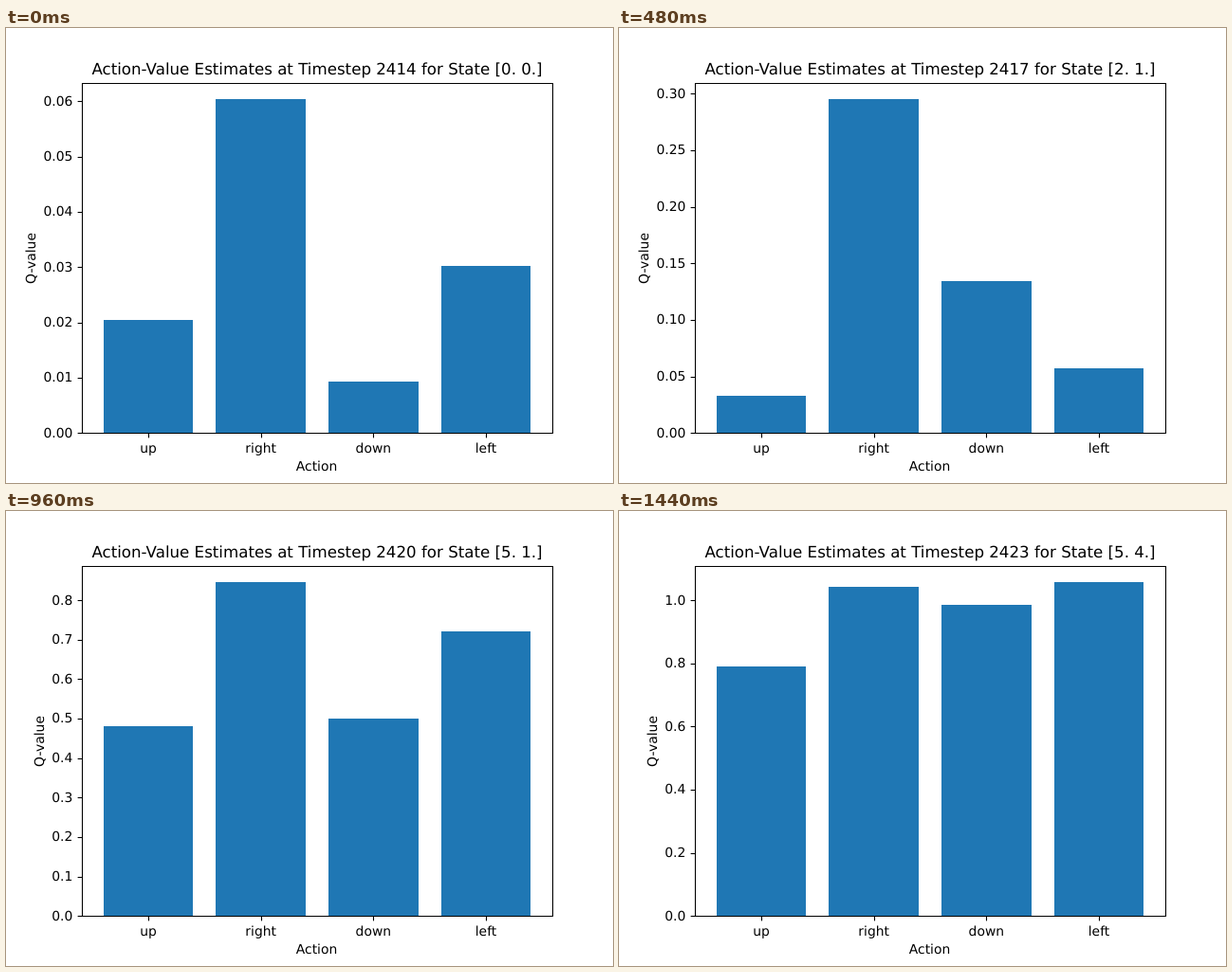
Animation, 640 px wide and 480 px high, one loop 1.6 s. Source, as an HTML page:

```html
<!DOCTYPE html>
<html lang="en">
<head>
<meta charset="utf-8">
<title>Action values</title>
<style>
  html, body { margin: 0; width: 100%; height: 100%; overflow: hidden; background: #fff; }
  svg { display: block; width: 640px; height: 480px; }
  text { font: 13.889px "DejaVu Sans", sans-serif; text-anchor: middle; text-rendering: geometricPrecision; }
  #title { font-size: 16.667px; }
  #yTicks text { text-anchor: end; }
  #bars { fill: #1f77b4; shape-rendering: crispEdges; }
  path { fill: none; stroke: #000; stroke-width: 1.1; }
</style>
</head>
<body>
<svg viewBox="0 0 640 480">
  <g id="bars"></g>
  <g id="xTicks"></g>
  <g id="yTicks"></g>
  <path d="M80.5 58.5H576.5V427.5H80.5Z"/>
  <text id="title" x="328" y="49"></text>
  <text x="327.5" y="467">Action</text>
  <text id="yLabel">Q-value</text>
</svg>
<script>
const STEP_MS = 160, FIRST_STEP = 2414;
const LEFT = 80, BOTTOM = 427.2, HEIGHT = 369.6;
const UNIT = 496 / 4.18;
const ACTIONS = ['up', 'right', 'down', 'left'];

// state, tick spacing, then one value per action
const STEPS = [
  ['0. 0.', 0.01, 0.02044, 0.06035, 0.0093, 0.0302],
  ['1. 0.', 0.02, 0.0031, 0.133, 0.0624, 0.0805],
  ['1. 1.', 0.02, 0.0073, 0.17, 0.0387, 0.0972],
  ['2. 1.', 0.05, 0.0329, 0.295, 0.1343, 0.0572],
  ['3. 1.', 0.1, 0.16, 0.47, 0.235, 0.255],
  ['4. 1.', 0.1, 0.2918, 0.6575, 0.3366, 0.4543],
  ['5. 1.', 0.1, 0.48, 0.845, 0.5, 0.72],
  ['5. 2.', 0.2, 0.677, 0.8886, 0.6576, 0.98],
  ['5. 3.', 0.2, 0.73, 0.965, 0.82, 1.02],
  ['5. 4.', 0.2, 0.79, 1.042, 0.9855, 1.0564]
];

const $ = id => document.getElementById(id);
const centre = i => LEFT + UNIT * (i + 0.59);

$('xTicks').innerHTML = ACTIONS.map((name, i) => {
  const x = centre(i);
  return `<path d="M${Math.round(x) + 0.5} 427.5v4.9"/><text x="${x}" y="448">${name}</text>`;
}).join('');

function bar(value, i, yOf) {
  const x = Math.round(centre(i) - 0.4 * UNIT);
  const right = Math.round(centre(i) + 0.4 * UNIT);
  const y = Math.round(yOf(value));
  return `<rect x="${x}" y="${y}" width="${right - x}" height="${427 - y}"/>`;
}

function yTick(value, digits, yOf) {
  const y = yOf(value);
  return `<path d="M80.5 ${Math.round(y) + 0.5}h-4.9"/>` +
    `<text x="70.3" y="${Math.floor(y + 5.07)}">${value.toFixed(digits)}</text>`;
}

function draw(index) {
  const [state, spacing, ...values] = STEPS[index];
  const limit = Math.max(...values) * 1.05;
  const yOf = v => BOTTOM - v / limit * HEIGHT;
  const digits = spacing < 0.1 ? 2 : 1;
  let ticks = '';
  for (let n = 0; n * spacing <= limit; n++) ticks += yTick(n * spacing, digits, yOf);

  $('bars').innerHTML = values.map((v, i) => bar(v, i, yOf)).join('');
  $('yTicks').innerHTML = ticks;
  $('title').textContent =
    `Action-Value Estimates at Timestep ${FIRST_STEP + index} for State [${state}]`;
  $('yLabel').setAttribute('transform', `translate(${digits === 2 ? 31 : 40} 243) rotate(-90)`);
}

let shown = -1;
function tick() {
  const index = Math.floor(performance.now() / STEP_MS) % STEPS.length;
  if (index !== shown) draw(shown = index);
  requestAnimationFrame(tick);
}
tick();
</script>
</body>
</html>
```
